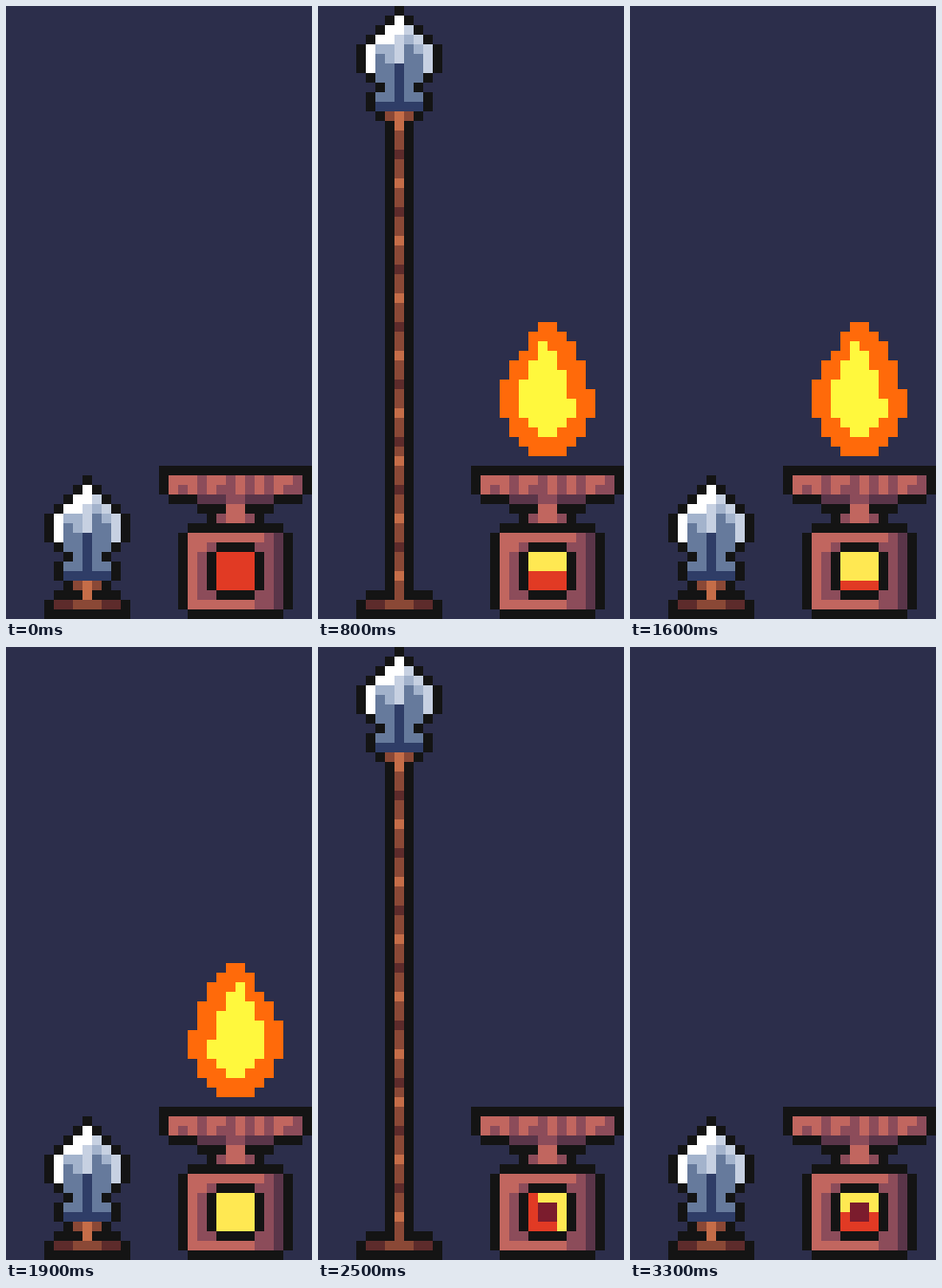
An HTML page with a canvas for the animation above (3400 ms loop, 320 by 640 pixels).

```html
<!DOCTYPE html>
<html lang="en">
<head>
<meta charset="utf-8">
<title>Spear trap and brazier</title>
<style>
  html, body { margin: 0; width: 100%; height: 100%; overflow: hidden; background: #2c2e4b; }
  canvas { display: block; width: 320px; height: 640px; }
</style>
</head>
<body>
<canvas id="stage" width="320" height="640"></canvas>
<script>
const ctx = document.getElementById('stage').getContext('2d');
const CELL = 10, STEP = 100, STEPS = 34, HALF = 17;

const COLORS = {
  K: '#141414', W: '#ffffff', L: '#c7d1e2', G: '#a3b3cc', S: '#667a9c', N: '#2f3d67',
  B: '#8a4836', O: '#c56d48', D: '#5d2b2b',
  R: '#c1665f', M: '#8c4c5a', P: '#5a3549',
  r: '#e13a24', y: '#ffe852', c: '#7b1c2d',
  f: '#ff6a0a', h: '#fff83d'
};

const HEAD = [
  '....K....',
  '...KWK...',
  '..KWWLK..',
  '.KWWLGLK.',
  'KWGGLSGLK',
  'KWSGLSSLK',
  'KWSSNSSLK',
  '.KSSNSSK.',
  '..KSNSK..',
  '.KSSNSSK.',
  '.KNNNNNK.',
  '..KBOBK..'
];

const SOCKET = ['.KK...KK.', 'KDDBBBDDK', 'KKKKKKKKK'];

const BRAZIER = [
  'KKKKKKKKKKKKKKKK',
  'KRRRMRRMRMRMRRMK',
  'KRMRMRMMRMRMRMMK',
  '.KKKPPPMMPPPKKK.',
  '....KKKRRKKK....',
  '.....KMRRMK.....',
  '...KKKKKKKKKK...',
  '..KRRRRRRRRMPK..',
  '..KRRMKKKKMMPK..',
  '..KRMKrrrrKMPK..',
  '..KRMKrrrrKMPK..',
  '..KRMKrrrrKMPK..',
  '..KRMKrrrrKMPK..',
  '..KRMMKKKKMMPK..',
  '..KRRRRRRRMMPK..',
  '...KKKKKKKKKK...'
];

const FLAME = [
  '....ff....',
  '...ffff...',
  '...fhfff..',
  '..ffhhff..',
  '.ffhhhfff.',
  '.ffhhhhff.',
  'ffhhhhhff.',
  'ffhhhhhfff',
  'ffhhhhhhff',
  'ffhhhhhhff',
  '.ffhhhhff.',
  '.fffhhfff.',
  '..ffffff..',
  '...ffff...'
];

const IGNITE = [
  ['.......ff.......', '....ffhhhhff....', 'ffffhhhhhhhhffff'],
  ['.......ff.......', '......ffff......', '.....ffhhff.....',
   '....ffhhhhff....', '....fhhhhhhf....', '.....ffhhff.....']
];

// Clockwise ring of the display, starting at its top left.
const RING = [[0,0],[1,0],[2,0],[3,0],[3,1],[3,2],[3,3],[2,3],[1,3],[0,3],[0,2],[0,1]];
const BRIGHTER = { N: 'S', S: 'G', G: 'L', L: 'W', W: 'W' };

function cells(x, y, w, h, key) {
  ctx.fillStyle = COLORS[key];
  ctx.fillRect(x * CELL, y * CELL, w * CELL, h * CELL);
}

function sprite(rows, x, y, tint = key => key) {
  rows.forEach((row, j) => [...row].forEach((key, i) => {
    if (key !== '.') cells(x + i, y + j, 1, 1, tint(key, j));
  }));
}

// Rows between the raised position and the tip.
function spearDrop(k) {
  if (k < 5 || k > 15) return 49;
  if (k === 5) return 24;
  if (k === 14) return 12;
  if (k === 15) return 32;
  return 0;
}

function spear(k) {
  const top = spearDrop(k);
  for (let r = 12; top + r < 62; r++) {
    const n = (r > 45 ? r + 1 : r) % 6;
    cells(7, top + r, 3, 1, 'K');
    cells(8, top + r, 1, 1, n === 0 ? 'O' : n === 3 ? 'D' : 'B');
  }
  const band = (k - 9) * 2 + 1;
  sprite(HEAD, 4, top, (key, row) => {
    if (!BRIGHTER[key]) return key;
    if (k === 7) return 'W';
    const lit = k >= 9 && k <= 13 && (row === band || row === band + 1);
    return lit ? BRIGHTER[key] : key;
  });
  sprite(SOCKET, 4, 61);
}

function flame(n) {
  if (n < 1 || n >= 21) return;
  if (n < 3) {
    const rows = IGNITE[n - 1];
    sprite(rows, 16, 48 - rows.length);
    return;
  }
  const rows = n % 2 ? FLAME.map(row => [...row].reverse().join('')) : FLAME;
  sprite(rows, 19, 33);
}

function display(n) {
  if (n < 21) {
    const filled = Math.max(0, Math.floor((n + 3) / 5));
    cells(22, 57, 4, Math.min(4, filled), 'y');
    return;
  }
  const turn = Math.floor((n - 21) / 5);
  RING.forEach(([x, y], i) => {
    cells(22 + x, 57 + y, 1, 1, (i + 11 + turn) % 12 < 6 ? 'y' : 'r');
  });
  cells(23, 58, 2, 2, 'c');
}

function draw(n) {
  ctx.fillStyle = '#2c2e4b';
  ctx.fillRect(0, 0, 320, 640);
  spear(n % HALF);
  sprite(BRAZIER, 16, 48);
  display(n);
  flame(n);
}

const start = performance.now();
function tick() {
  const t = Math.max(0, performance.now() - start);
  draw(Math.floor(t / STEP) % STEPS);
  requestAnimationFrame(tick);
}
tick();
</script>
</body>
</html>
```
